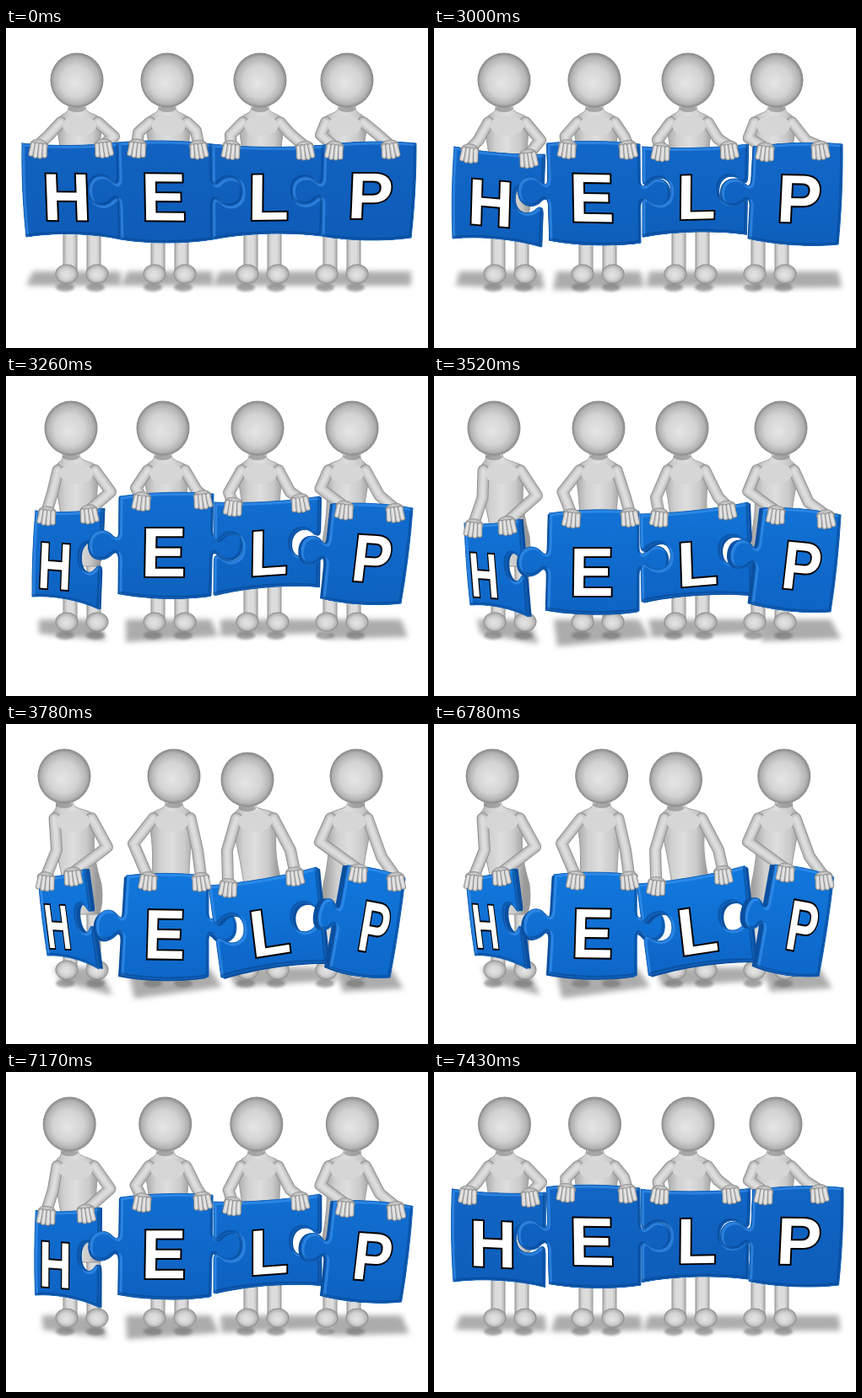
An HTML page with a canvas for the animation above (7.56 s loop, 500 by 380 pixels).

```html
<!DOCTYPE html>
<html lang="en">
<head>
<meta charset="utf-8">
<title>Help puzzle</title>
<style>
html, body { margin: 0; width: 100%; height: 100%; overflow: hidden; background: #fff; }
canvas { display: block; }
</style>
</head>
<body>
<canvas id="stage" width="500" height="380"></canvas>
<script>
const ctx = document.getElementById('stage').getContext('2d');
const LOOP = 7560, STEP = 130, TAB = 36;
const OPENING = [1, 1.5, 2, 2.5, 3, 3.5];
const CLOSING = [3.93, 3.5, 3, 2.3, 1.4, .5];

// Pose rows: corners clockwise from top left, letter centre, head x.
// sides: 1 is a tab, -1 a socket, 0 straight.
const people = [
  {
    letter: 'H', c: 90, w: 114, sides: [0, -1], bulge: [3, -5], depth: [5, 0], shade: [306, 322],
    grip: [[.17, .85], [.16, .74]], elbows: [[50, 128, 128, 129], [60, 150, 120, 146]],
    poses: [
      [19, 137, 133, 136, 136, 251, 24, 248, 72, 200, 84],
      [24, 141, 131, 150, 127, 260, 22, 250, 67, 207, 83],
      [35, 160, 115, 157, 110, 277, 31, 262, 58, 225, 77],
      [36, 175, 102, 170, 112, 286, 43, 272, 59, 236, 71],
      [38, 182, 94, 172, 110, 291, 49, 275, 61, 240, 69]
    ]
  },
  {
    letter: 'E', c: 194, w: 110, sides: [1, 1], bulge: [-3, 4], depth: [-3, 2], shade: [326, 312],
    grip: [[.2, .86], [.26, .91]], elbows: [[157, 124, 225, 122], [151, 142, 227, 150]],
    poses: [
      [133, 136, 244, 138, 245, 251, 136, 251, 187, 200, 191],
      [134, 137, 244, 138, 245, 255, 137, 252, 187, 201, 190],
      [135, 143, 246, 140, 243, 261, 134, 258, 187, 208, 186],
      [137, 163, 243, 161, 243, 279, 134, 277, 187, 232, 195],
      [143, 180, 240, 181, 240, 300, 136, 298, 188, 249, 199]
    ]
  },
  {
    letter: 'L', c: 304, w: 132, sides: [-1, -1], bulge: [3, -5], depth: [4, 2], shade: [312, 304],
    grip: [[.17, .83], [.18, .8]], elbows: [[266, 127, 336, 125], [262, 150, 337, 150]],
    poses: [
      [244, 138, 377, 139, 374, 247, 245, 251, 311, 200, 301],
      [247, 141, 372, 138, 370, 245, 247, 248, 311, 200, 301],
      [247, 150, 372, 143, 370, 250, 246, 260, 311, 209, 298],
      [244, 164, 372, 150, 377, 260, 246, 268, 312, 222, 294],
      [240, 192, 368, 170, 380, 283, 255, 301, 312, 246, 286]
    ]
  },
  {
    letter: 'P', c: 398, w: 107, sides: [1, 0], bulge: [-3, 4], depth: [-6, 0], shade: [318, 314],
    grip: [[.11, .72], [.18, .84]], elbows: [[373, 127, 440, 126], [372, 140, 445, 158]],
    poses: [
      [377, 139, 486, 137, 480, 249, 374, 247, 432, 198, 404],
      [379, 141, 484, 138, 479, 257, 373, 250, 433, 202, 406],
      [387, 152, 482, 157, 468, 270, 375, 264, 434, 216, 410],
      [390, 157, 482, 165, 470, 280, 376, 270, 436, 225, 411],
      [405, 168, 473, 183, 455, 301, 383, 289, 437, 241, 415]
    ]
  }
];

const mix = (a, b, k) => a + (b - a) * k;
const mixAll = (a, b, k) => a.map((n, i) => mix(n, b[i], k));

function phase(t) {
  if (t < 3000) return 0;
  if (t < 3780) return OPENING[Math.floor((t - 3000) / STEP)];
  if (t < 6780) return 4;
  return CLOSING[Math.min(5, Math.floor((t - 6780) / STEP))];
}

function poseOf(p, pos) {
  const i = Math.min(3, Math.floor(pos)), k = pos / 4;
  const row = mixAll(p.poses[i], p.poses[i + 1], pos - i);
  const q = row.slice(0, 8), grip = mixAll(p.grip[0], p.grip[1], k);
  return {
    k, q, lx: row[8], ly: row[9], hx: row[10],
    hy: p.letter === 'L' ? 62 + 4 * Math.max(0, pos - 3) : 62,
    elbows: mixAll(p.elbows[0], p.elbows[1], k),
    hands: grip.map(u => [mix(q[0], q[2], u), mix(q[1], q[3], u) + 8])
  };
}

function limb(pts, w) {
  ctx.lineCap = ctx.lineJoin = 'round';
  [['#929292', 0], ['#b9b9b9', 2], ['#cdcdcd', 5], ['#dcdcdc', 9]].forEach(([color, cut]) => {
    if (w <= cut) return;
    ctx.strokeStyle = color;
    ctx.lineWidth = w - cut;
    ctx.beginPath();
    pts.forEach(([x, y]) => ctx.lineTo(x, y));
    ctx.stroke();
  });
}

function ball(x, y, rx, ry) {
  ctx.save();
  ctx.translate(x, y);
  ctx.scale(rx, ry);
  const g = ctx.createRadialGradient(-.1, .12, .05, 0, 0, 1);
  g.addColorStop(0, '#e4e4e4');
  g.addColorStop(.55, '#d3d3d3');
  g.addColorStop(.86, '#b2b2b2');
  g.addColorStop(1, '#858585');
  ctx.fillStyle = g;
  ctx.beginPath();
  ctx.arc(0, 0, 1, 0, 7);
  ctx.fill();
  ctx.restore();
}

function drawShadow(p, s) {
  const [, , , , rx, , lx] = s.q, shift = 16 * s.k;
  const nearL = mix(306, p.shade[0], s.k), nearR = mix(306, p.shade[1], s.k);
  ctx.save();
  ctx.filter = 'blur(3px)';
  ctx.fillStyle = 'rgba(105,105,105,.55)';
  ctx.beginPath();
  ctx.moveTo(lx + 8, 289);
  ctx.lineTo(rx, 289);
  ctx.lineTo(rx + shift, nearR);
  ctx.lineTo(lx + shift, nearL);
  ctx.fill();
  ctx.filter = 'blur(1.5px)';
  ctx.fillStyle = 'rgba(110,110,110,.6)';
  [-20, 16].forEach(dx => {
    ctx.beginPath();
    ctx.ellipse(p.c + dx, 308, 11, 5, 0, 0, 7);
    ctx.fill();
  });
  ctx.restore();
}

function drawBody(p, s) {
  const { hx, hy, hands, elbows: e } = s, c = p.c, chest = (hx + c) / 2;
  [-1, 1].forEach(d => {
    limb([[c + d * 13, 195], [c + d * 14, 240], [c + d * 14, 288]], 17);
    ball(c + d * 18, 292, 13.5, 11.5);
  });

  const g = ctx.createLinearGradient(chest - 28, 0, chest + 28, 0);
  g.addColorStop(0, '#a2a2a2');
  g.addColorStop(.25, '#d0d0d0');
  g.addColorStop(.5, '#dedede');
  g.addColorStop(.78, '#cacaca');
  g.addColorStop(1, '#999');
  ctx.fillStyle = g;
  ctx.strokeStyle = '#9a9a9a';
  ctx.lineWidth = 1;
  ctx.beginPath();
  ctx.moveTo(hx - 10, hy + 29);
  ctx.bezierCurveTo(hx - 8, 104, chest - 22, 99, chest - 27, 111);
  ctx.bezierCurveTo(chest - 26, 130, chest - 20, 145, c - 22, 190);
  ctx.quadraticCurveTo(c - 25, 215, c - 20, 226);
  ctx.lineTo(c + 20, 226);
  ctx.quadraticCurveTo(c + 26, 215, c + 23, 190);
  ctx.bezierCurveTo(chest + 20, 145, chest + 26, 130, chest + 27, 111);
  ctx.bezierCurveTo(chest + 22, 99, hx + 8, 104, hx + 10, hy + 29);
  ctx.fill();
  ctx.stroke();

  [-1, 1].forEach((d, i) => {
    limb([[chest + d * 22, 112], [e[i * 2], e[i * 2 + 1]], [hands[i][0], hands[i][1] - 6]], 14);
  });
  // blend the shoulders into the chest
  ctx.fillStyle = '#d6d6d6';
  ctx.beginPath();
  ctx.ellipse(chest, 116, 20, 12, 0, 0, 7);
  ctx.fill();
  ctx.fillStyle = 'rgba(90,90,90,.4)';
  ctx.beginPath();
  ctx.ellipse(hx, hy + 34, 10, 4, 0, 0, 7);
  ctx.fill();
  ball(hx, hy, 31.5, 32.5);
}

// Maps the unit square to a piece's four corners.
const place = q => (u, v) => [0, 1].map(i =>
  mix(mix(q[i], q[i + 2], u), mix(q[i + 6], q[i + 4], u), v));

function outline(p, q) {
  const at = place(q), path = new Path2D(), len = TAB / p.w;
  const line = (u, v) => path.lineTo(...at(u, v));
  const curve = (...n) => path.bezierCurveTo(...at(n[0], n[1]), ...at(n[2], n[3]), ...at(n[4], n[5]));

  function side(edge, kind, dir) {
    if (!kind) {
      const out = edge ? 1.02 : -.02;
      return curve(out, .5 - dir * .17, out, .5 + dir * .17, edge, .5 + dir * .5);
    }
    const sign = (edge ? 1 : -1) * kind;
    const U = n => edge + sign * n * len, V = n => .5 + dir * n;
    line(edge, V(-.15));
    curve(U(0), V(-.05), U(.14), V(-.07), U(.24), V(-.1));
    curve(U(.5), V(-.19), U(1), V(-.16), U(1), V(0));
    curve(U(1), V(.16), U(.5), V(.19), U(.24), V(.1));
    curve(U(.14), V(.07), U(0), V(.05), U(0), V(.15));
    line(edge, V(.5));
  }

  const top = p.bulge[0] / 85, bottom = 1 + p.bulge[1] / 85;
  path.moveTo(...at(0, 0));
  curve(.3, top, .7, top, 1, 0);
  side(1, p.sides[1], 1);
  curve(.7, bottom, .3, bottom, 0, 1);
  side(0, p.sides[0], -1);
  path.closePath();
  return path;
}

function drawPiece(p, s) {
  const { q, k } = s, path = outline(p, q);
  const [dx, dy] = p.depth;

  ctx.fillStyle = '#0b4f9f';
  for (let i = 4; i > 0; i--) {
    ctx.save();
    ctx.translate(dx * k * i / 4, dy * k * i / 4);
    ctx.fill(path);
    ctx.restore();
  }

  const g = ctx.createLinearGradient(0, q[1], 0, q[5]);
  g.addColorStop(0, `rgb(17,${mix(98, 119, k)},${mix(193, 220, k)})`);
  g.addColorStop(1, `rgb(14,${mix(92, 103, k)},${mix(184, 200, k)})`);
  ctx.fillStyle = g;
  ctx.fill(path);

  ctx.save();
  ctx.clip(path);
  ctx.lineJoin = 'round';
  ctx.translate(1.5, 1.5);
  ctx.strokeStyle = 'rgba(70,155,245,.5)';
  ctx.lineWidth = 4;
  ctx.stroke(path);
  ctx.translate(-3, -3);
  ctx.strokeStyle = 'rgba(5,60,130,.45)';
  ctx.lineWidth = 3;
  ctx.stroke(path);
  ctx.restore();
  ctx.strokeStyle = '#1262b8';
  ctx.lineWidth = 1;
  ctx.stroke(path);

  const ax = (q[2] - q[0] + q[4] - q[6]) / 2 / p.w, ay = (q[3] - q[1] + q[5] - q[7]) / 2 / p.w;
  const bx = (q[6] - q[0] + q[4] - q[2]) / 228, by = (q[7] - q[1] + q[5] - q[3]) / 228;
  ctx.save();
  ctx.transform(ax, ay, bx, by, s.lx, s.ly);
  ctx.font = 'bold 80px "Liberation Sans", Arial, sans-serif';
  ctx.textAlign = 'center';
  ctx.lineJoin = 'miter';
  ctx.lineWidth = 4;
  ctx.strokeStyle = '#000';
  ctx.fillStyle = '#fff';
  ctx.strokeText(p.letter, 0, 28.5);
  ctx.fillText(p.letter, 0, 28.5);
  ctx.restore();
}

function drawHand([x, y], d) {
  ctx.save();
  ctx.translate(x, y);
  ctx.rotate(-d * .12);
  ball(0, -6, 11, 7);
  for (let i = 0; i < 4; i++) {
    const fx = (i - 1.5) * 5.4, drop = 8 - Math.abs(i - 1.5) * 1.5;
    ctx.lineCap = 'round';
    [['#808080', 6.4], ['#c9c9c9', 5], ['#e4e4e4', 2.4]].forEach(([color, w]) => {
      ctx.strokeStyle = color;
      ctx.lineWidth = w;
      ctx.beginPath();
      ctx.moveTo(fx * .85, -6);
      ctx.lineTo(fx, drop);
      ctx.stroke();
    });
  }
  ctx.restore();
}

function draw(pos) {
  ctx.fillStyle = '#fff';
  ctx.fillRect(0, 0, 500, 380);
  const crew = people.map(p => [p, poseOf(p, pos)]);
  crew.forEach(a => drawShadow(...a));
  crew.forEach(a => drawBody(...a));
  crew.forEach(a => drawPiece(...a));
  crew.forEach(([, s]) => s.hands.forEach((h, i) => drawHand(h, i ? 1 : -1)));
}

const start = performance.now();
function frame() {
  draw(phase((performance.now() - start) % LOOP));
  requestAnimationFrame(frame);
}
frame();
</script>
</body>
</html>
```
